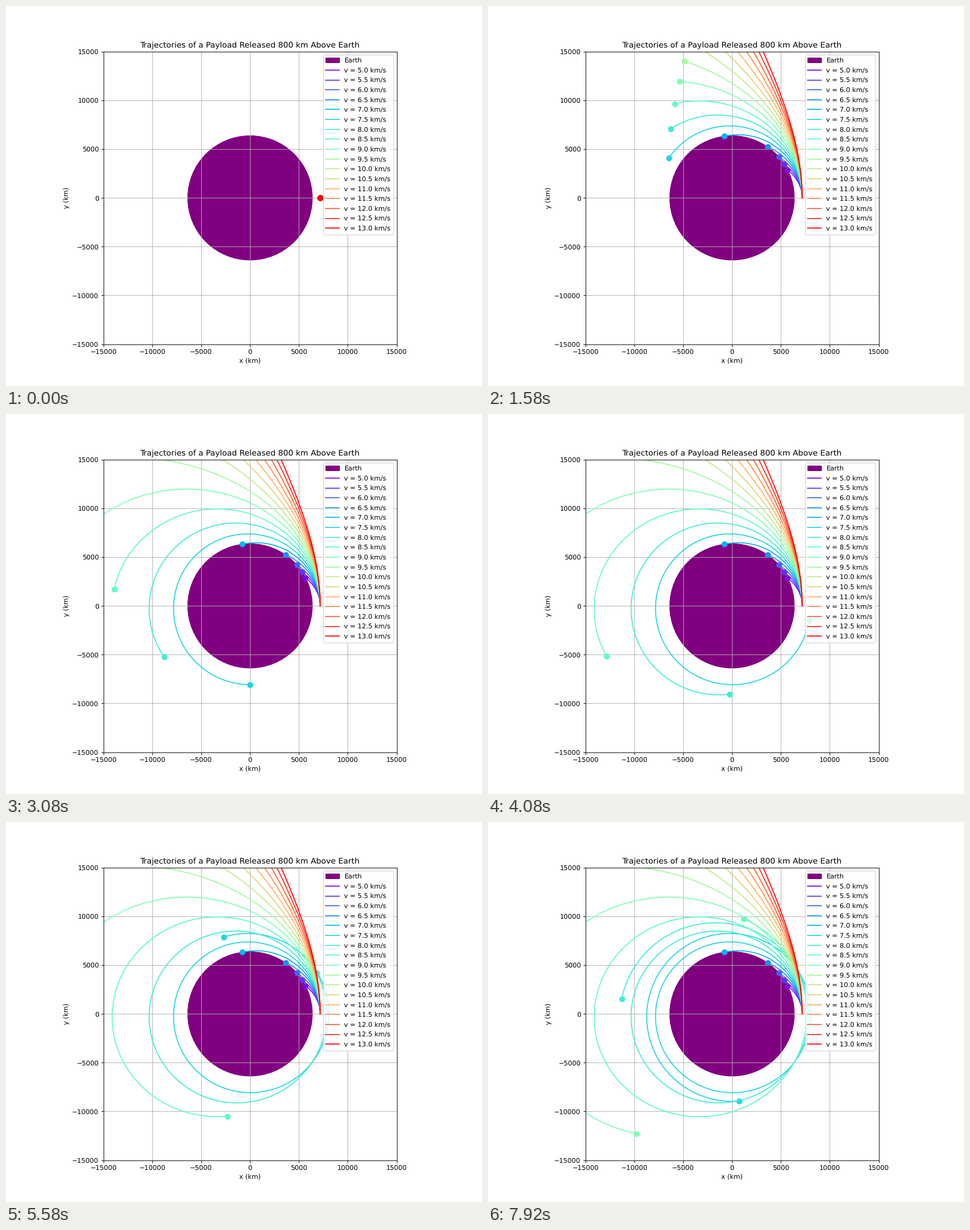
Write a matplotlib script that moves like this. It is 800x640 px and loops after 8000 ms.

```python
import math

import matplotlib.pyplot as plt
import numpy as np
from matplotlib.animation import FuncAnimation

MU = 398600.0            # km^3/s^2
EARTH_RADIUS = 6371.0    # km
ALTITUDE = 800.0         # km
DT = 10.0                # s per integration step
STRIDE = 8               # integration steps per simulation tick
LIMIT = 15000            # km, half width of the view

LOOP_MS = 8000
INTERVAL = 40
FRAMES = LOOP_MS // INTERVAL
POSE_RATE = 12           # new poses per second
LEAD_MS = 35             # keeps each pose on time despite the 40 ms grid


def step_at(frame):
    """Integration step shown: simulation ticks run at 20 per second."""
    pose = (frame * INTERVAL + LEAD_MS) * POSE_RATE // 1000
    return STRIDE * math.ceil(pose * 20 / POSE_RATE)


def trajectory(speed, steps):
    """Explicit Euler path, ending at the first point inside the Earth."""
    x, y, vx, vy = EARTH_RADIUS + ALTITUDE, 0.0, 0.0, speed
    path = [(x, y)]
    for _ in range(steps):
        pull = -MU / math.hypot(x, y) ** 3
        gx, gy = pull * x, pull * y
        x, y = x + vx * DT, y + vy * DT
        vx, vy = vx + gx * DT, vy + gy * DT
        path.append((x, y))
        if math.hypot(x, y) < EARTH_RADIUS:
            break
    return np.array(path)


plt.rcParams["text.hinting"] = "none"

speeds = np.arange(5.0, 13.01, 0.5)
colors = plt.cm.rainbow(np.linspace(0, 1, len(speeds)))
paths = [trajectory(v, step_at(FRAMES)) for v in speeds]

fig, ax = plt.subplots(figsize=(10, 8), dpi=80)
fig.subplots_adjust(left=0.1252, right=0.9002)
ax.set_xlim(-LIMIT, LIMIT)
ax.set_ylim(-LIMIT, LIMIT)
ax.set_aspect("equal")
ax.add_patch(plt.Circle((0, 0), EARTH_RADIUS, color="purple", label="Earth"))

trails, dots = [], []
for v, color in zip(speeds, colors):
    trails += ax.plot([], [], color=color, label=f"v = {v:.1f} km/s")
    dots += ax.plot([], [], "o", color=color, markersize=8)

ax.set_title("Trajectories of a Payload Released 800 km Above Earth")
ax.set_xlabel("x (km)")
ax.set_ylabel("y (km)")
ax.grid(True)
ax.legend(loc="upper right", labelspacing=0.54)


def update(frame):
    step = step_at(frame)
    for path, trail, dot in zip(paths, trails, dots):
        seen = path[:step + 1]
        trail.set_data(seen[:, 0], seen[:, 1])
        dot.set_data(seen[-1:, 0], seen[-1:, 1])
    return trails + dots


anim = FuncAnimation(fig, update, frames=FRAMES, interval=INTERVAL,
                     init_func=lambda: update(0), repeat=True, repeat_delay=0)
plt.show()
```
